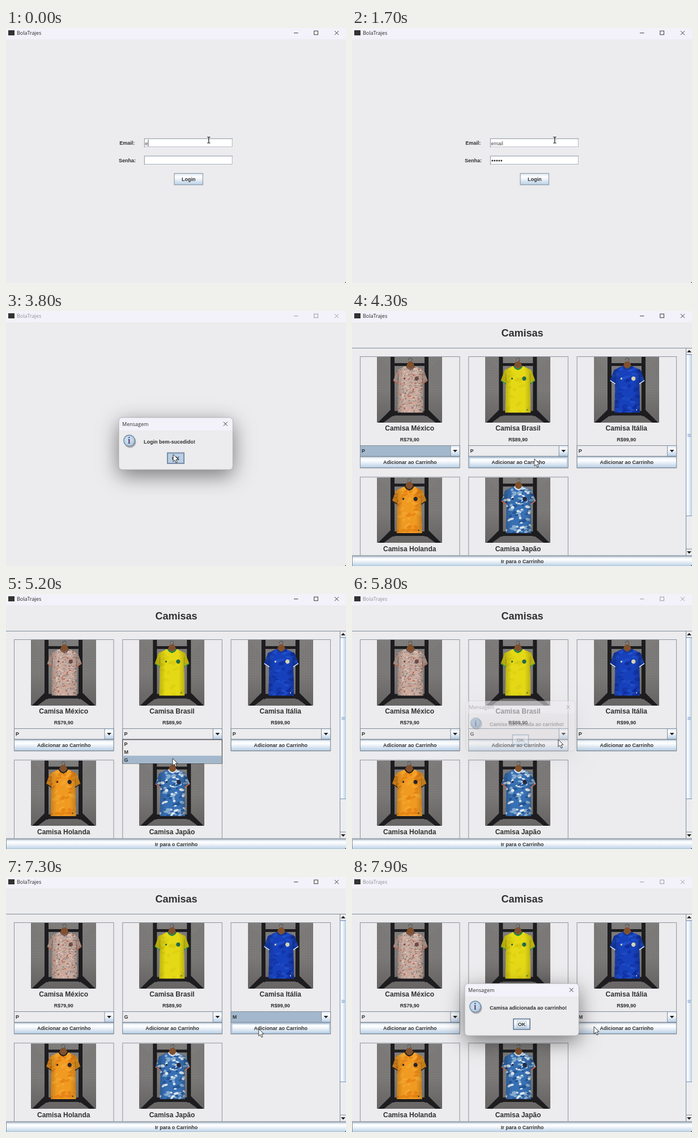
An HTML page with a canvas that plays this animation: 600x450 px, repeating every 8000 ms.

```html
<!DOCTYPE html>
<html lang="pt">
<head>
<meta charset="utf-8">
<style>
html, body { margin: 0; width: 100%; height: 100%; overflow: hidden; background: #ecebed; }
canvas { display: block; }
</style>
</head>
<body>
<canvas id="stage" width="600" height="450"></canvas>
<script>
const LOOP = 8000;
const ctx = document.getElementById('stage').getContext('2d');
const SANS = '"Liberation Sans", Arial, sans-serif';
const UI = '"Open Sans", sans-serif';
const BG = '#ecebed', BAR = '#f3f1f9', EDGE = '#7f8d9b', PALE = '#b8cfe5', SELECT = '#a3b8cc', INK = '#303030';

const clamp = v => Math.max(0, Math.min(1, v));

function rect(x, y, w, h, fill, stroke, width = 1, c = ctx) {
  if (fill) { c.fillStyle = fill; c.fillRect(x, y, w, h); }
  if (stroke) { c.strokeStyle = stroke; c.lineWidth = width; c.strokeRect(x, y, w, h); }
}
function shape(points, fill, stroke, width = 1, c = ctx) {
  c.beginPath();
  points.forEach(([x, y]) => c.lineTo(x, y));
  if (fill) { c.closePath(); c.fillStyle = fill; c.fill(); }
  if (stroke) { c.strokeStyle = stroke; c.lineWidth = width; c.stroke(); }
}
function disc(x, y, r, fill, c = ctx) {
  c.beginPath();
  c.arc(x, y, r, 0, 7);
  c.fillStyle = fill;
  c.fill();
}
function text(s, x, y, size = 9, { bold = true, align = 'left', color = INK, family = SANS } = {}) {
  ctx.font = `${bold ? 'bold ' : ''}${size}px ${family}`;
  ctx.textAlign = align;
  ctx.fillStyle = color;
  ctx.fillText(s, x, y);
}
const centered = (s, x, y, size) => text(s, x, y, size, { align: 'center' });

function metal(x0, y0, x1, y1) {
  const g = ctx.createLinearGradient(x0, y0, x1, y1);
  g.addColorStop(0, '#dde8f3');
  g.addColorStop(.3, '#ffffff');
  g.addColorStop(.5, '#eef3f9');
  g.addColorStop(1, PALE);
  return g;
}
function button(label, x, y, w, h, { pressed, hover, focus } = {}) {
  rect(x, y, w, h, pressed ? PALE : metal(0, y, 0, y + h), EDGE);
  if (hover) rect(x + 1.5, y + 1.5, w - 3, h - 3, null, PALE, 2);
  centered(label, x + w / 2, y + h / 2 + 3.4);
  if (focus) {
    const tw = ctx.measureText(label).width;
    rect(x + w / 2 - tw / 2 - 1, y + h / 2 - 5, tw + 2, 11, null, SELECT, .8);
  }
}
function cross(x, y, r, color) {
  shape([[x - r, y - r], [x + r, y + r]], null, color, .9);
  shape([[x - r, y + r], [x + r, y - r]], null, color, .9);
}

// ---- Product pictures ----
let seed = 11;
const rnd = () => (seed = seed * 16807 % 2147483647) / 2147483647;
const between = (a, b) => a + rnd() * (b - a);

const OUTLINE = [[49, 16], [34, 23], [27, 42], [36, 48], [35, 98], [80, 98], [79, 48], [88, 42], [81, 23], [66, 16], [57.5, 21]];

function picture({ base, blobs, count, size, trim, collar, crest, dx }) {
  const cv = document.createElement('canvas');
  cv.width = cv.height = 230;
  const c = cv.getContext('2d');
  c.scale(2, 2);
  rect(0, 0, 115, 115, '#a5a3a2', null, 1, c);
  for (let i = -115; i < 230; i += 3) {
    shape([[i, 0], [i + 115, 115]], null, '#666463', .8, c);
    shape([[i, 0], [i - 115, 115]], null, '#666463', .8, c);
  }
  const floor = c.createLinearGradient(0, 60, 0, 115);
  floor.addColorStop(0, 'rgba(60,58,58,0)');
  floor.addColorStop(1, 'rgba(60,58,58,.35)');
  rect(0, 60, 115, 55, floor, null, 1, c);
  const dark = '#1d1c1f';
  rect(24, 0, 7, 104, dark, null, 1, c);
  rect(84, 0, 7, 104, dark, null, 1, c);
  rect(24, 11, 67, 5, dark, null, 1, c);
  rect(24, 95, 67, 8, dark, null, 1, c);
  shape([[24, 93], [31, 93], [31, 101], [12, 115], [2, 115]], dark, null, 1, c);
  shape([[84, 93], [91, 93], [113, 115], [103, 115], [84, 101]], dark, null, 1, c);

  c.translate(dx, 0);
  c.beginPath();
  c.arc(57.5, 5, 3, 2.8, 7.6);
  c.strokeStyle = '#555';
  c.lineWidth = 1;
  c.stroke();
  shape([[54, 8], [61, 8], [67, 20], [48, 20]], '#80512f', null, 1, c);

  c.save();
  shape(OUTLINE, base, null, 1, c);
  c.clip();
  for (let i = 0; i < count; i++) {
    c.beginPath();
    c.ellipse(between(26, 89), between(16, 98), between(.4, 1) * size, between(.25, .5) * size, between(-.8, .3), 0, 7);
    c.fillStyle = blobs[i % blobs.length];
    c.fill();
  }
  const fold = c.createLinearGradient(34, 0, 81, 0);
  fold.addColorStop(0, 'rgba(0,0,0,.2)');
  fold.addColorStop(.25, 'rgba(0,0,0,0)');
  fold.addColorStop(.75, 'rgba(0,0,0,0)');
  fold.addColorStop(1, 'rgba(0,0,0,.2)');
  rect(26, 16, 64, 84, fold, null, 1, c);
  shape([[36, 30], [36, 50]], null, 'rgba(0,0,0,.2)', 1, c);
  shape([[79, 30], [79, 50]], null, 'rgba(0,0,0,.2)', 1, c);
  shape([[27, 42], [36, 48]], null, trim, 3, c);
  shape([[88, 42], [79, 48]], null, trim, 3, c);
  c.restore();
  shape([[50, 16], [53, 20], [57.5, 22], [62, 20], [65, 16]], null, collar, 2.2, c);
  disc(68.5, 38, 3.7, crest, c);
  disc(47, 38, 1.6, crest, c);
  disc(74, 93, 1.1, crest, c);
  return cv;
}

const PRODUCTS = [
  { name: 'México', price: 'R$79,90', base: '#c8aca1', blobs: ['#dfd2ca', '#b7644f', '#a58f88', '#d99f87', '#858a86'], count: 480, size: 2.1, trim: '#b8664f', collar: '#775348', crest: '#6a4b48', dx: 1.5 },
  { name: 'Brasil', price: 'R$89,90', base: '#e5d916', blobs: ['rgba(200,184,5,.25)'], count: 25, size: 7, trim: '#239252', collar: '#198449', crest: '#246b4b', dx: 0 },
  { name: 'Itália', price: 'R$99,90', base: '#1741bc', blobs: ['rgba(40,91,216,.5)', 'rgba(13,39,145,.45)'], count: 60, size: 8, trim: '#dce5f2', collar: '#16358e', crest: '#d6d3b1', dx: 1.5 },
  { name: 'Holanda', base: '#f09a22', blobs: ['rgba(222,117,13,.55)', 'rgba(250,178,55,.5)'], count: 65, size: 7, trim: '#242326', collar: '#27211d', crest: '#27262a', dx: -.5 },
  { name: 'Japão', base: '#3870b4', blobs: ['#dce5ec', '#255595', '#87add0'], count: 125, size: 5.2, trim: '#d7653c', collar: '#dce4ec', crest: '#252a3d', dx: 1 }
].map(p => ({ ...p, image: picture(p) }));

// ---- Timeline ----
const PATH = [
  [0, 357, 197], [2000, 357, 197], [2500, 300, 262], [2700, 297, 260], [3100, 297, 260],
  [3300, 275, 235], [3600, 295, 253], [4000, 295, 253], [4300, 322, 261], [4700, 372, 246],
  [4900, 372, 246], [5200, 294, 290], [5400, 294, 291], [5700, 364, 257], [6500, 364, 257],
  [6800, 563, 246], [7000, 503, 278], [7100, 500, 279], [7400, 427, 264], [8000, 427, 264]
];
const ADDED = 'Camisa adicionada ao carrinho!';
const DIALOGS = [
  { start: 1800, end: 3900, message: 'Login bem-sucedido!' },
  { start: 5800, end: 6400, message: ADDED },
  { start: 7500, end: 8400, message: ADDED }
];
const POPUPS = [{ card: 1, start: 4800, end: 5400 }, { card: 2, start: 6800, end: 7100 }];
const KEYS = [100, 200, 400, 500];
const DOTS = [800, 900, 1000, 1100, 1200];

function pointer(t) {
  const i = PATH.findIndex(p => p[0] > t);
  const [t0, x0, y0] = PATH[i - 1], [t1, x1, y1] = PATH[i];
  const k = (t - t0) / (t1 - t0), e = k * k * (3 - 2 * k);
  return [x0 + (x1 - x0) * e, y0 + (y1 - y0) * e];
}
const during = (t, { start, end }) => t >= start && t < end;
const typed = (times, t) => times.filter(k => k <= t).length;

// ---- Screens ----
function titleBar(active) {
  const color = active ? '#252525' : '#929197';
  rect(0, 0, 600, 20, BAR);
  rect(4, 4, 11, 9, '#303331');
  text('BolaTrajes', 19, 12.2, 9, { bold: false, color, family: UI });
  shape([[508, 8.8], [515.5, 8.8]], null, color, .9);
  rect(543.8, 5.2, 6.6, 6.6, null, color, .9);
  cross(583.5, 8.7, 3.5, color);
}

function field(y) {
  rect(244.3, y, 155, 14.7, '#fff', EDGE, .9);
  shape([[245, y + 15.5], [400.2, y + 15.5], [400.2, y + 1]], null, '#fff', .8);
}
function loginScreen(t) {
  text('Email:', 200.3, 206.3);
  text('Senha:', 199, 237.3);
  field(195.3);
  field(226);
  const word = 'email'.slice(0, 1 + typed(KEYS, t)), dots = typed(DOTS, t);
  text(word, 245.3, 206.6, 9, { bold: false, color: '#484848' });
  const caret = 245.6 + ctx.measureText(word).width;
  for (let i = 0; i < dots; i++) disc(247.7 + i * 4, 234.1, 1.5, '#333');
  if (t < 700) rect(caret, 197, .8, 12, '#333');
  else if (t < 1200) rect(246 + dots * 4, 227.5, .8, 12, '#333');
  button('Login', 297, 256.7, 50.3, 20, { focus: t >= 1200 && t < 1700 });
}

function arrow(x, y, dir = 1) {
  shape([[x - 4, y - 2 * dir], [x + 4, y - 2 * dir], [x, y + 2.3 * dir]], '#222');
}
function combo(x, value, focused) {
  rect(x, 237.5, 175.5, 18.7, focused ? SELECT : BG, EDGE);
  rect(x + 159.5, 237.5, 16, 18.7, metal(0, 237.5, 0, 256), EDGE);
  arrow(x + 167.5, 247);
  text(value, x + 2.6, 250.2);
}
function card(p, i, t, mx, my, modal) {
  const x = 14.5 + (i % 3) * 191.3, y = i < 3 ? 80.5 : 293, mid = x + 87.2;
  rect(x, y, 175.5, 196.5, null, '#8c959e');
  ctx.drawImage(p.image, x + 29.6, y + .5, 115, 115.5);
  centered('Camisa ' + p.name, mid, y + 130.8, 12);
  if (!p.price) return;
  centered(p.price, mid, 230.2);
  const value = i === 1 && t >= 5400 ? 'G' : i === 2 && t >= 7100 ? 'M' : 'P';
  const comboFocus = [t < 4800, t >= 5400 && t < 5700, t >= 7100 && t < 7400][i];
  const buttonFocus = i === 1 ? t >= 5700 && t < 6800 : i === 2 && t >= 7400;
  combo(x, value, comboFocus);
  const inside = mx > x && mx < x + 175 && my > 257 && my < 277;
  button('Adicionar ao Carrinho', x, 257.3, 175.5, 19.2, {
    hover: inside && !modal && !POPUPS.some(q => during(t, q)),
    focus: buttonFocus && !modal
  });
}
function popup(x, my) {
  const row = Math.max(0, Math.min(2, Math.floor((my - 258) / 13.8)));
  rect(x, 257, 175.5, 42, BG, '#333');
  rect(x + .5, 257.8 + row * 13.8, 174.5, 13.6, SELECT);
  ['P', 'M', 'G'].forEach((s, i) => text(s, x + 2.6, 268.3 + i * 13.8));
}
function scrollBar() {
  rect(589.5, 65.5, 11, 366, '#ecedf0', EDGE);
  rect(589.5, 65.5, 11, 11.5, BG, EDGE);
  arrow(595, 71, -1);
  rect(589.5, 77, 11, 284.5, metal(589, 0, 600, 0), '#7895bd');
  for (let y = 217; y < 223; y += 2) rect(592, y, 6, .8, '#7895bd');
  rect(589.5, 420, 11, 11.5, BG, EDGE);
  arrow(595, 426);
}
function shopScreen(t, mx, my, modal) {
  centered('Camisas', 300.5, 45, 18);
  ctx.save();
  ctx.beginPath();
  ctx.rect(0, 65, 589, 366);
  ctx.clip();
  PRODUCTS.forEach((p, i) => card(p, i, t, mx, my, modal));
  const open = POPUPS.find(p => during(t, p));
  if (open) popup(14.5 + open.card * 191.3, my);
  ctx.restore();
  shape([[0, 65.5], [600, 65.5]], null, EDGE);
  scrollBar();
  shape([[0, 431.5], [600, 431.5]], null, EDGE);
  button('Ir para o Carrinho', .5, 433.3, 600, 17);
}

function dialog(t, { start, end, message }) {
  const alpha = t < end ? clamp((t - start + 100) / 300) : .25;
  const scale = .94 + .06 * alpha, pressed = t >= end - 100;
  ctx.save();
  ctx.translate(245, 205);
  ctx.scale(scale, scale);
  ctx.translate(-245, -205);
  ctx.globalAlpha = alpha;
  ctx.save();
  ctx.shadowColor = `rgba(0,0,0,${.5 * alpha})`;
  ctx.shadowBlur = 36;
  ctx.shadowOffsetY = 10;
  ctx.beginPath();
  ctx.roundRect(199, 188, 201.3, 92, 6);
  ctx.fillStyle = BG;
  ctx.fill();
  ctx.restore();
  ctx.save();
  ctx.clip();
  rect(199, 188, 202, 23, BAR);
  ctx.restore();
  ctx.strokeStyle = '#aaa9ad';
  ctx.lineWidth = .8;
  ctx.stroke();
  text('Mensagem', 205, 202.6, 9, { bold: false, family: UI });
  cross(387.3, 199.2, 3.5, '#252525');
  disc(219, 231, 10.5, 'rgba(70,75,85,.4)');
  disc(217.5, 228.7, 10.4, '#667d9c');
  disc(217.5, 228.7, 9.3, '#b7cee5');
  disc(216.7, 227.5, 6.5, '#c9dced');
  text('i', 217.3, 234, 16, { align: 'center', color: '#3d4d88', family: '"Liberation Serif", serif' });
  rect(216.2, 227, 1, 6, '#a84f5e');
  text(message, 243, 234);
  button('OK', 284.5, 250, 30, 19.3, { pressed });
  rect(285.2, 250.7, 28.6, 17.9, null, '#7188a3', 1.4);
  if (!pressed) rect(291.5, 254.5, 16, 11, null, SELECT, .8);
  ctx.restore();
}

function cursor(x, y, beam) {
  if (beam) {
    shape([[355, 192.5], [360.5, 192.5]], null, '#222');
    shape([[357.8, 192.5], [357.8, 203]], null, '#222', 1.3);
    shape([[355, 203], [360.5, 203]], null, '#222');
    return;
  }
  const tip = [[0, 0], [0, 12.8], [2.9, 10], [5, 15], [7.2, 14], [5.1, 9.2], [9, 9]];
  const at = tip.map(([a, b]) => [x + a, y + b]);
  shape([...at, at[0]], '#fff', '#222', .9);
}

function draw(t) {
  const [mx, my] = pointer(t);
  const modal = DIALOGS.some(d => during(t, d));
  rect(0, 0, 600, 450, BG);
  if (t < 4100) loginScreen(t);
  else shopScreen(t, mx, my, modal);
  titleBar(!modal);
  shape([[600, 448], [600, 450], [598, 450]], '#333');
  const shown = DIALOGS.find(d => t >= d.start && t < d.end + 100);
  if (shown) dialog(t, shown);
  cursor(mx, my, t < 1900);
}

function tick() {
  draw(Math.floor(performance.now() % LOOP / 100) * 100);
  requestAnimationFrame(tick);
}
tick();
</script>
</body>
</html>
```
